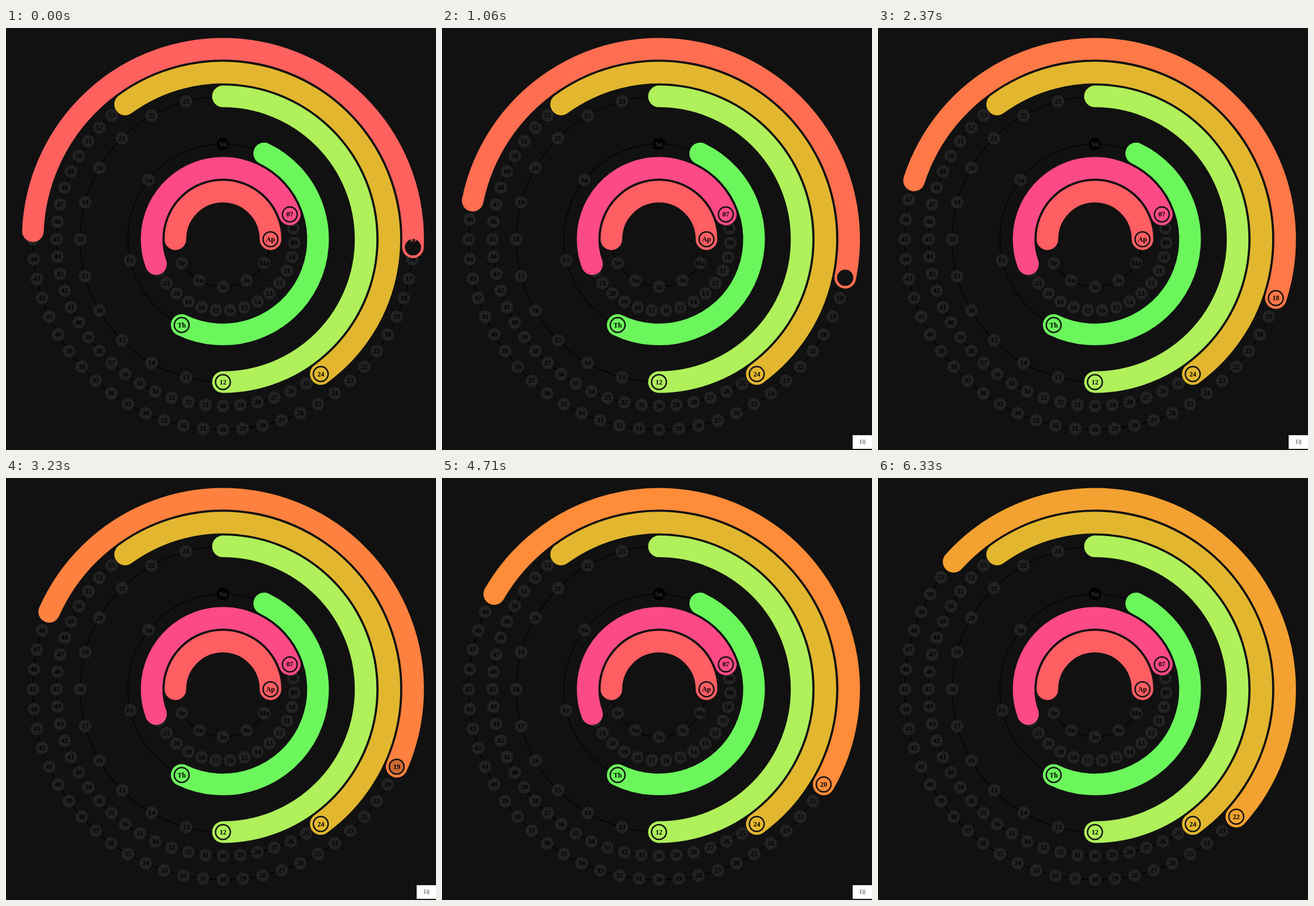
Animation, 756 px wide and 741 px high, one loop 6.4 s. Source, as an HTML page with a canvas:

```html
<!DOCTYPE html>
<html lang="en">
<head>
<meta charset="utf-8">
<title>Polar clock</title>
<style>
html, body { margin: 0; width: 100%; height: 100%; overflow: hidden; background: #111; }
canvas { display: block; }
</style>
</head>
<body>
<canvas id="stage" width="756" height="741"></canvas>
<script>
const ctx = document.getElementById('stage').getContext('2d');
const LOOP = 6400, CX = 381.4, CY = 370.9, R = 418, ARM = 19, TAU = Math.PI * 2;
const DARK = '#111';

const clamp = x => Math.max(0, Math.min(1, x));
const ease = x => x < .5 ? 4 * x ** 3 : 1 - 4 * (1 - x) ** 3;
const numbers = (n, first = 0) => Array.from({length: n}, (_, i) => String(i + first).padStart(2, '0'));

const fields = [
  {r: .2, value: 3, labels: 'Ja Fe Ma Ap Ma Ju Ju Au Se Oc No De'.split(' ')},
  {r: .3, value: 6, labels: numbers(31, 1)},
  {r: .4, value: 4, labels: 'Su Mo Tu We Th Fr Sa'.split(' ')},
  {r: .6, value: 12, labels: numbers(24)},
  {r: .7, value: 24, labels: numbers(60)},
  {r: .8, value: 15, labels: numbers(60)}
];
const seconds = fields[5];

// Cyclical cubehelix rainbow, t in 0..1
function rainbow(t) {
  const d = Math.abs(t - .5), l = .8 - .9 * d, a = (1.5 - 1.5 * d) * l * (1 - l);
  const h = (360 * t + 20) * Math.PI / 180, c = Math.cos(h), s = Math.sin(h);
  const part = k => Math.round(255 * clamp(l + a * k));
  return `rgb(${part(-.14861 * c + 1.78277 * s)},${part(-.29227 * c - .90649 * s)},${part(1.97294 * c)})`;
}

function place(f, value) {
  const a = value / f.labels.length * TAU;
  return [CX + R * f.r * Math.sin(a), CY - R * f.r * Math.cos(a)];
}

function disc([x, y], r, fill) {
  ctx.beginPath();
  ctx.arc(x, y, r, 0, TAU);
  ctx.fillStyle = fill;
  ctx.fill();
}

function label(f, i, fill) {
  const [x, y] = place(f, i);
  ctx.font = 'bold 12px "Liberation Serif", "Times New Roman", serif';
  ctx.fillStyle = fill;
  ctx.fillText(f.labels[i], x, y + 4);
}

function drawTrack(f) {
  ctx.beginPath();
  ctx.arc(CX, CY, R * f.r, 0, TAU);
  ctx.strokeStyle = '#000';
  ctx.lineWidth = 1.25;
  ctx.stroke();
  f.labels.forEach((_, i) => {
    disc(place(f, i), 11, i ? '#222' : '#000');
    label(f, i, i ? '#000' : '#333');
  });
}

// cover: opacity of the dark disc that hides the number while the arm turns
function drawArm(f, value, cover, from, to) {
  const end = value / f.labels.length * TAU - Math.PI / 2;
  const color = rainbow(value / f.labels.length), tip = place(f, value);
  ctx.beginPath();
  ctx.arc(CX, CY, R * f.r, end - Math.PI, end);
  ctx.strokeStyle = color;
  ctx.lineWidth = ARM * 2;
  ctx.lineCap = 'round';
  ctx.stroke();

  ctx.globalAlpha = cover;
  disc(tip, 13, DARK);
  ctx.globalAlpha = 1;
  ctx.beginPath();
  ctx.arc(...tip, 13, 0, TAU);
  ctx.strokeStyle = DARK;
  ctx.lineWidth = 2.5;
  ctx.stroke();
  if (cover === 1) label(f, from, color);
  else label(f, to, '#000');
}

// Start of each second's turn; the first is already under way
const starts = [0, 680, 1690, 2650, 3695, 4715, 5565];

function drawSeconds(t) {
  const i = starts.filter(s => s <= t).length - 1;
  const age = i ? t - starts[i] : t < 210 ? 232 + Math.min(t, 70) : t + 190;
  const from = 15 + i;
  const cover = 1 - ease(clamp((age - 500) / 130));
  drawArm(seconds, from + ease(clamp(age / 500)), cover, from, from + 1);
}

function drawKey(t) {
  const alpha = t < 660 ? 0 : Math.min(clamp(.63 + (t - 670) / 200), clamp(1 - (t - 5535) / 200));
  if (!alpha) return;
  ctx.globalAlpha = alpha;
  ctx.fillStyle = '#333';
  for (const x of [731, 748]) ctx.fillRect(x, 713, 1, 28);
  ctx.fillStyle = '#fff';
  ctx.fillRect(722, 715, 34, 24);
  ctx.fillStyle = '#555';
  ctx.font = '10px "Open Sans", sans-serif';
  ctx.fillText('F8', 739.5, 731);
  ctx.globalAlpha = 1;
}

function draw(t) {
  ctx.fillStyle = DARK;
  ctx.fillRect(0, 0, 756, 741);
  ctx.textAlign = 'center';
  fields.forEach(drawTrack);
  fields.slice(0, 5).forEach(f => drawArm(f, f.value, 0, f.value, f.value));
  drawSeconds(t);
  drawKey(t);
}

const begin = performance.now();
function frame() {
  draw((performance.now() - begin) % LOOP);
  requestAnimationFrame(frame);
}
frame();
</script>
</body>
</html>
```
